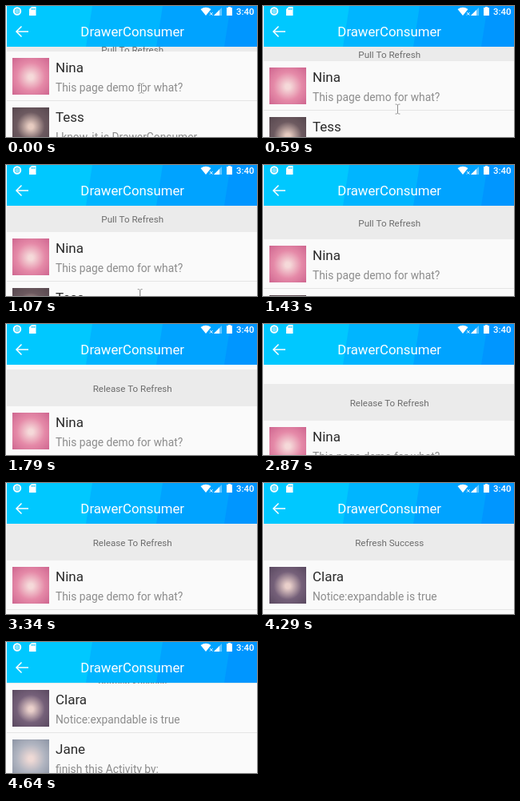
These frames come from a looping animation (314 by 164 pixels, 4.74 s). An HTML page with a canvas:

```html
<!DOCTYPE html>
<html lang="en">
<head>
<meta charset="utf-8">
<title>Pull to refresh</title>
<style>
  html, body { margin: 0; width: 100%; height: 100%; overflow: hidden; background: #fafafa; }
  canvas { display: block; }
</style>
</head>
<body>
<canvas id="stage" width="314" height="164"></canvas>
<script>
const ctx = document.getElementById('stage').getContext('2d');
const W = 314, H = 164, LOOP = 4740;
const BAR = 51, HEAD = 46, ROW = 62, MID = 158.2;
const FONT = 'Roboto, Arial, sans-serif';
const PAPER = '#fafafa';

const TICKS = 40, SHORT = [5, 27, 32, 39];
const starts = Array.from({ length: TICKS }, (_, i) =>
  120 * i - 10 * SHORT.filter(s => i >= s).length);

// Pull distance: [tick, pixels]
const PULL = [[0, 6], [5, 18], [9, 33], [10, 36], [15, 52], [19, 65], [20, 65],
  [21, 68], [23, 68], [24, 70], [26, 70], [27, 53], [28, 46], [36, 46],
  [37, 29], [38, 9], [39, 1]];
const SPIN_ON = 29, SPIN_STOP = 33, DONE = 36;

// Header colour bands: [left edge, colour]
const BANDS = [[0, '#00c8ff'], [104, '#00b5ff'], [192, '#00a3ff'], [277, '#0096ff']];

const before = [
  { name: 'Nina', note: 'This page demo for what?', tones: ['#f5d9d9', '#e58aa8', '#cf6690'] },
  { name: 'Tess', note: 'I know, it is DrawerConsumer', tones: ['#e6cbc0', '#6d5a60', '#57484f'] }
];
const after = [
  { name: 'Clara', note: 'Notice:expandable is true', tones: ['#e9cfca', '#756079', '#5a4960'] },
  { name: 'Jane', note: 'finish this Activity by:', tones: ['#eed9d5', '#b1b5c1', '#8d95a5'] }
];

function pullAt(tick) {
  const k = Math.max(1, PULL.findIndex(p => p[0] >= tick));
  const [t0, d0] = PULL[k - 1], [t1, d1] = PULL[k];
  return Math.round(d0 + (d1 - d0) * (tick - t0) / (t1 - t0));
}

function box(x, y, w, h, fill) {
  ctx.fillStyle = fill;
  ctx.fillRect(x, y, w, h);
}

function label(str, x, y, size, fill, align = 'left', weight = 400) {
  ctx.font = `${weight} ${size}px ${FONT}`;
  ctx.textAlign = align;
  ctx.fillStyle = fill;
  ctx.fillText(str, x, y);
}

function path(points, close) {
  ctx.beginPath();
  points.forEach(([x, y]) => ctx.lineTo(x, y));
  if (close) ctx.closePath();
}

function stroke(color, width) {
  ctx.strokeStyle = color;
  ctx.lineWidth = width;
  ctx.stroke();
}

function drawRow({ name, note, tones }, y) {
  box(1, y, W, ROW, PAPER);
  const g = ctx.createRadialGradient(31, y + 32, 3, 31, y + 31, 32);
  tones.forEach((c, i) => g.addColorStop(i / 2, c));
  box(8, y + 8, 46, 46, g);
  label(name, 62, y + 26, 17, '#2a2a2a');
  label(note, 62, y + 50, 13.8, '#8c8c8c');
  box(1, y + ROW - 1, W, 1, '#e5e5e5');
}

function drawSpinner(x, y, turn) {
  ctx.save();
  ctx.translate(x, y);
  ctx.rotate(turn * Math.PI / 6);
  for (let i = 0; i < 12; i++) {
    ctx.rotate(Math.PI / 6);
    path([[0, -3], [0, -6]]);
    stroke(`rgba(90,90,90,${0.2 + i * 0.065})`, 1.2);
  }
  ctx.restore();
}

function drawRefresh(tick, d) {
  const h = Math.min(HEAD, d), top = BAR + d - h, mid = top + h / 2;
  box(1, top, W, h, '#ebebeb');
  let str = 'Pull To Refresh';
  if (tick >= DONE) str = 'Refresh Success';
  else if (tick >= SPIN_ON) str = 'Refreshing';
  else if (tick >= 28 || d >= HEAD) str = 'Release To Refresh';
  label(str, MID, mid + 4.5, 11.6, '#6c6c6c', 'center');
  if (tick >= SPIN_ON && tick < DONE) drawSpinner(89.5, mid, Math.min(tick, SPIN_STOP));
}

function drawStatus() {
  ctx.beginPath();
  ctx.arc(14, 6.5, 4.2, 0, 7);
  stroke('#fff', 2);
  ctx.beginPath();
  ctx.arc(14, 6.5, 2.8, 0, 7);
  ctx.fillStyle = 'rgba(255,255,255,.5)';
  ctx.fill();

  path([[32, 1], [37.5, 1], [37.5, 12], [29, 12], [29, 4]], true);
  ctx.fillStyle = '#fff';
  ctx.fill();
  for (let i = 0; i < 3; i++) box(31.8 + i * 1.8, 2.5, 0.9, 2.5, '#00c8ff');

  ctx.fillStyle = '#fff';
  ctx.beginPath();
  ctx.moveTo(250, 12);
  ctx.lineTo(243.5, 4);
  ctx.quadraticCurveTo(250, -0.5, 256.5, 4);
  ctx.fill();
  path([[255, 8], [258.5, 11.5]]);
  stroke('#fff', 1);
  path([[258.5, 8], [255, 11.5]]);
  stroke('#fff', 1);
  path([[270, 2], [270, 12], [260, 12]], true);
  ctx.fillStyle = 'rgba(255,255,255,.4)';
  ctx.fill();
  path([[267, 5], [267, 12], [260, 12]], true);
  ctx.fillStyle = '#fff';
  ctx.fill();
  box(276, 2, 7, 10, '#fff');
  box(278, 1, 3, 1, '#fff');
  label('3:40', 288, 11, 11.4, '#fff', 'left', 500);
}

function drawBar() {
  const lean = 4;
  for (const [x, color] of BANDS) {
    path([[Math.max(1, x + lean), 0], [W, 0], [W, BAR], [Math.max(1, x - lean), BAR]], true);
    ctx.fillStyle = color;
    ctx.fill();
  }
  box(0, 0, 1, BAR, PAPER);
  box(1, 0, 4, BAR, BANDS[0][1]);
  drawStatus();
  path([[28, 32], [13, 32]]);
  stroke('#fff', 1.5);
  path([[19.5, 25.5], [13, 32], [19.5, 38.5]]);
  stroke('#fff', 1.5);
  label('DrawerConsumer', MID, 38, 16.8, '#fff', 'center');
}

function drawCursor(x, y) {
  for (const [color, width] of [['#fff', 2.4], ['#888', 0.9]]) {
    for (const side of [-1, 1]) {
      path([[x + side * 3, y - 6], [x + side, y - 6], [x, y - 5],
        [x, y + 5], [x + side, y + 6], [x + side * 3, y + 6]]);
      stroke(color, width);
    }
  }
}

function draw(ms) {
  const tick = starts.filter(s => s <= ms).length - 1;
  const d = pullAt(tick);
  box(0, 0, W, H, PAPER);
  drawRefresh(tick, d);
  (tick < DONE ? before : after).forEach((row, i) => drawRow(row, BAR + d + i * ROW));
  drawBar();
  if (tick < 15) drawCursor(169.5 - tick * 0.2, 103 + (d - 6) * 2.17);
}

let begin;
function loop(now) {
  begin ??= now;
  draw((now - begin) % LOOP);
  requestAnimationFrame(loop);
}
draw(0);
requestAnimationFrame(loop);
</script>
</body>
</html>
```
